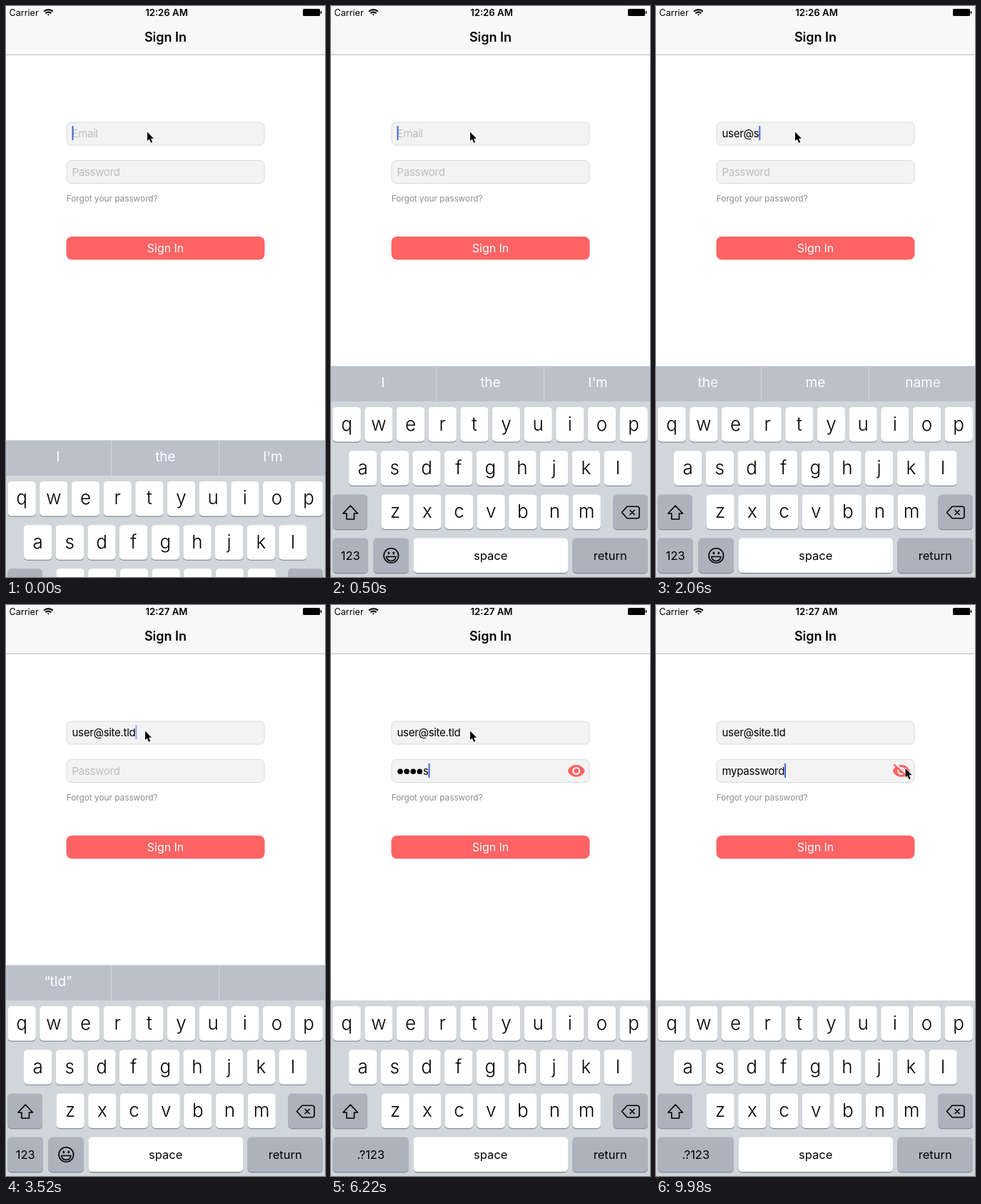
Write an HTML page that moves like this. It is 447 px wide and 800 px high and loops after 10 s.

```html
<!DOCTYPE html>
<html lang="en">
<head>
<meta charset="utf-8">
<title>Sign In</title>
<style>
  html, body { margin: 0; width: 100%; height: 100%; overflow: hidden; background: #fff; }
  svg { display: block; font-family: Inter, "Open Sans", sans-serif; }
  text { white-space: pre; }
  .mid { text-anchor: middle; }
  .input { font-size: 15px; letter-spacing: -.3px; }
  .hint { fill: #bcbcc1; }
  .letter { font-size: 26px; font-weight: 300; }
  .label { font-size: 16.5px; }
  .word { font-size: 19px; fill: #fff; }
  .line { fill: none; stroke: #000; stroke-width: 1.6; stroke-linejoin: round; }
</style>
</head>
<body>
<svg width="447" height="800" viewBox="0 0 447 800">
  <rect width="447" height="68" fill="#f8f8f8"/>
  <path d="M0 68.3H447" stroke="#b9b9b9"/>
  <text x="4.5" y="14" font-size="12.6">Carrier</text>
  <g fill="none" stroke="#000" stroke-width="2">
    <path d="M53 7.6q6.4-5 12.8 0M55.3 10.3q4.1-3.4 8.2 0"/>
    <path d="M57.6 11.6h3.6l-1.8 2z" fill="#000" stroke="none"/>
  </g>
  <text id="clock" class="mid" x="225" y="14" font-size="13.2" font-weight="600"></text>
  <rect x="416" y="4" width="24" height="10" rx="1.5"/>
  <rect x="440.7" y="7" width="1.6" height="4" rx=".8"/>
  <text class="mid" x="223.5" y="50" font-size="18" font-weight="600">Sign In</text>

  <g fill="#f3f3f3" stroke="#d9d9d9">
    <rect x="85" y="163" width="277" height="32" rx="6.5"/>
    <rect x="85" y="216.5" width="277" height="32" rx="6.5"/>
  </g>
  <text class="input hint" id="emailHint" x="92.5" y="184">Email</text>
  <text class="input" id="email" x="92.5" y="184"></text>
  <text class="input hint" id="passHint" x="92.5" y="237.5">Password</text>
  <g id="dots"></g>
  <text class="input" id="pass" y="237.5"></text>
  <rect id="caret" width="2" height="20" fill="#3f6bd6"/>
  <g id="eye" transform="translate(343.7 232.4)" fill="#ff6364">
    <path d="M-12 0C-10-5-5.5-8.3 0-8.3S10-5 12 0C10 5 5.5 8.3 0 8.3S-10 5-12 0z"/>
    <circle r="5.5" fill="#f3f3f3"/>
    <circle r="3.3"/>
    <g id="slash" stroke-width="2.2">
      <path d="M-8.5-10L11.5 8" stroke="#f3f3f3"/>
      <path d="M-10.5-9L9.5 9" stroke="#ff6364"/>
    </g>
  </g>
  <text x="84.7" y="274" font-size="11.8" fill="#8c8c8c">Forgot your password?</text>
  <rect x="84.5" y="323" width="278" height="32.5" rx="8" fill="#ff6364"/>
  <text class="mid" x="223.5" y="345" font-size="15.9" fill="#fff">Sign In</text>

  <g id="keyboard">
    <g id="bar">
      <rect y="504.5" width="447" height="60" fill="#bbc0ca"/>
      <path d="M147.5 504.5v50M298.5 504.5v50" stroke="#d3d7dd"/>
      <g id="words"></g>
    </g>
    <rect y="554" width="447" height="246" fill="#d1d6db"/>
    <g id="keys"></g>
    <path class="line" d="M27.2 700l10.3 11h-5v8h-10.6v-8h-5z"/>
    <path class="line" d="M415 701.3h14q3 0 3 3v10.4q0 3-3 3h-14l-7.5-8.2zM418.6 706l7 7m0-7l-7 7"/>
    <g id="emailKeys"></g>
    <g id="passKeys"></g>
  </g>
  <path id="pointer" d="M0 0V12.6L2.8 10 5 15.2 7.2 14.2 5 9.2H9z" stroke="#fff" stroke-width="1.2" paint-order="stroke"/>
</svg>
<script>
const $ = id => document.getElementById(id);
const clamp = v => Math.min(1, Math.max(0, v));
const ease = v => { v = clamp(v); return v * v * (3 - 2 * v); };
const show = (id, on) => { $(id).style.display = on ? "" : "none"; };

const GREY = "#adb3bd";
const LOOP = 10000, TAB = 3750, REVEAL = 8600;
const EMAIL = "user@site.tld", PASSWORD = "mypassword";
const emailTimes = [1100, 1250, 1400, 1560, 1800, 1960, 2200, 2320, 2440, 2620, 2760, 2880, 3000];
const passTimes = [4700, 5080, 5460, 5800, 6120, 6400, 6650, 6900, 7150, 7400];
// Suggestions after each typed character of the email
const suggestions = [
  "I,the,I'm", "“u”,up,us", "us,use,up", "“use”,used,user", "user,users,used", "I,the,I'm",
  "the,me,name", "“si”,six,is", "“sit”,site,sir", "site,sites,sit", "I,the,I'm",
  "“t”,the,to", "“tl”,,", "“tld”,,"
].map(s => s.split(","));

function key(x, y, w, fill, label = "", style = "label", base = 30) {
  return `<rect x="${x}" y="${y + 1.3}" width="${w}" height="48.5" rx="5" fill="#8a8e95"/>
    <rect x="${x}" y="${y}" width="${w}" height="48.5" rx="5" fill="${fill}"/>
    <text class="mid ${style}" x="${x + w / 2}" y="${y + base}">${label}</text>`;
}

$("keys").innerHTML = ["qwertyuiop", "asdfghjkl", "zxcvbnm"].map((row, r) =>
  [...row].map((c, i) =>
    key([2.5, 25, 70.5][r] + 44.67 * i, 562 + 61.2 * r, 39.3, "#fff", c, "letter", 32.5)).join("")
).join("") +
  key(2.5, 684.4, 48.5, GREY) + key(395.5, 684.4, 48.5, GREY) +
  key(115.5, 745.6, 216.5, "#fff", "space") + key(338.5, 745.6, 105.5, GREY, "return");
$("emailKeys").innerHTML = key(2.5, 745.6, 49.5, GREY, "123") + key(59.5, 745.6, 49.5, GREY) +
  `<circle class="line" cx="84.3" cy="770" r="10.3"/>
   <ellipse cx="80.8" cy="766.6" rx="1.3" ry="2"/><ellipse cx="87.8" cy="766.6" rx="1.3" ry="2"/>
   <path class="line" d="M77.5 771.5h13.6q-1.4 6-6.8 6t-6.8-6z"/>`;
$("passKeys").innerHTML = key(2.5, 745.6, 106.5, GREY, ".?123");

// Letters of a new suggestion appear from left to right
const sweep = (word, p) => [...word].map((c, i) =>
  `<tspan fill-opacity="${clamp(p * 2 - i / word.length).toFixed(2)}">${c}</tspan>`).join("");

function blink(age) {
  const u = age < 0 ? 0 : age % 1000;
  return u < 700 ? 1 - clamp((u - 450) / 150) : clamp((u - 800) / 150);
}

function draw(t) {
  const typed = emailTimes.filter(v => v <= t).length;
  const hidden = passTimes.filter(v => v <= t).length;
  const inPass = t >= TAB, revealed = t >= REVEAL;

  $("clock").textContent = t < 2800 ? "12:26 AM" : "12:27 AM";
  $("email").textContent = EMAIL.slice(0, typed);
  show("emailHint", !typed);
  show("passHint", !hidden);

  const peek = hidden && t - passTimes[hidden - 1] < 1000;
  const dots = revealed ? 0 : hidden - (peek ? 1 : 0);
  $("dots").innerHTML = Array.from({ length: dots }, (_, i) =>
    `<circle cx="${97 + 9.1 * i}" cy="233.2" r="3.8"/>`).join("");
  const passX = 92.5 + 9.1 * dots;
  $("pass").setAttribute("x", passX);
  $("pass").textContent = PASSWORD.slice(dots, hidden);

  const caretX = inPass ? passX + $("pass").getComputedTextLength()
                        : 92.5 + $("email").getComputedTextLength();
  const lastEdit = Math.max(120, ...[...emailTimes, TAB, ...passTimes, REVEAL].filter(v => v <= t));
  $("caret").setAttribute("x", caretX);
  $("caret").setAttribute("y", inPass ? 222 : 168);
  $("caret").setAttribute("opacity", blink(t - lastEdit));
  show("eye", inPass);
  show("slash", revealed);

  const p = typed ? (t - emailTimes[typed - 1]) / 130 : 1;
  $("words").innerHTML = suggestions[typed].map((word, i) =>
    `<text class="mid word" x="${72.8 + 150.6 * i}" y="534">${sweep(word, p)}</text>`).join("");
  $("bar").setAttribute("transform", `translate(0 ${50 * ease((t - TAB) / 200)})`);
  show("emailKeys", !inPass);
  show("passKeys", inPass);

  // Critically damped slide, already under way when the loop starts
  const w = 18 * (t + 122) / 1000;
  const drop = t < 500 ? 296 * (1 + w) * Math.exp(-w) : 0;
  $("keyboard").setAttribute("transform", `translate(0 ${drop})`);

  const move = ease((t - 6950) / 550);
  const px = 198 - 3 * ease(t / 350) + 155 * move;
  $("pointer").setAttribute("transform", `translate(${px - (move ? 0.5 * move : 0)} ${176.5 + 52.5 * move})`);
}

const start = performance.now();
function frame() {
  draw((performance.now() - start) % LOOP);
  requestAnimationFrame(frame);
}
frame();
</script>
</body>
</html>
```
